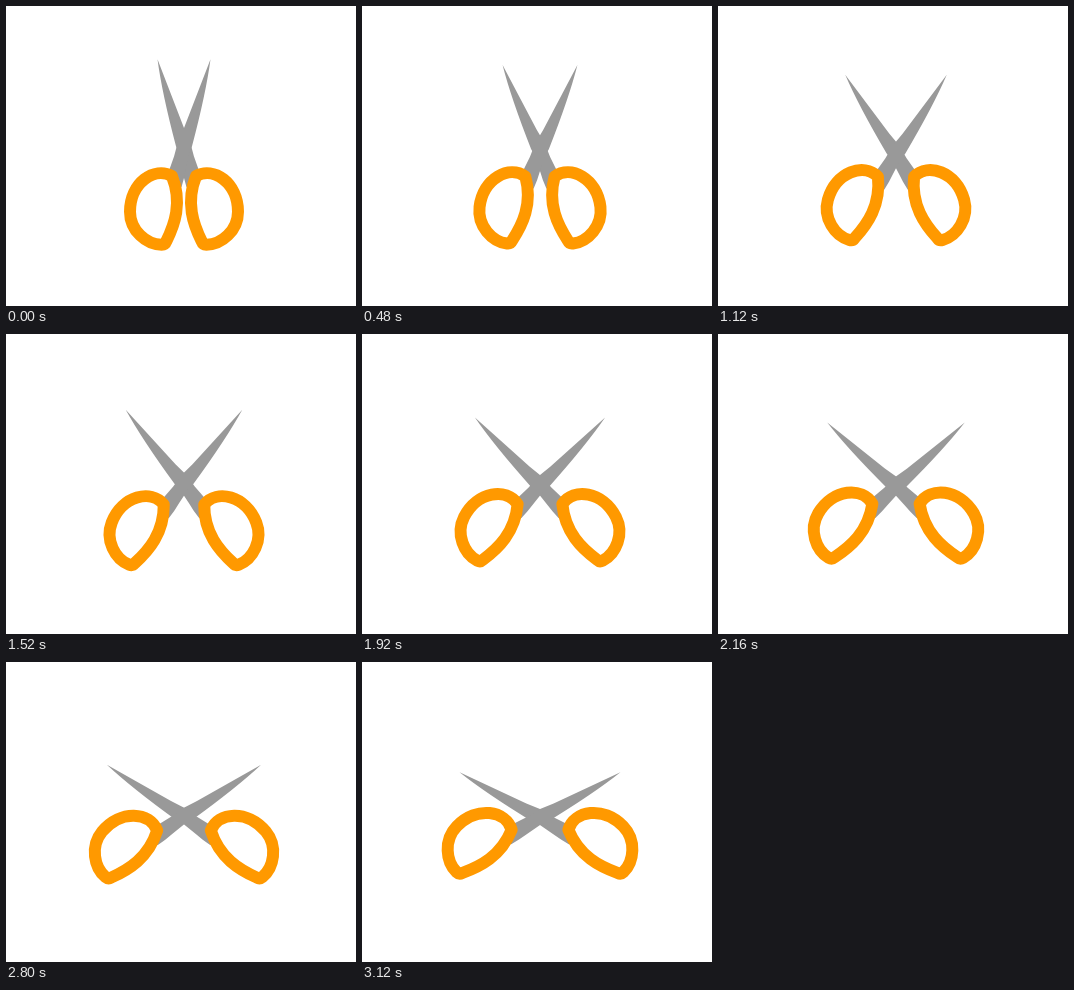
Animation of 350 by 300 pixels, one loop 3200 ms. Source, as an HTML page:

```html
<!DOCTYPE html>
<html lang="en">
<head>
<meta charset="utf-8">
<title>Scissors</title>
<style>
  html, body { margin: 0; width: 100%; height: 100%; overflow: hidden; background: #fff; }
  svg { display: block; }
  .blade { fill: #999; }
  .handle { fill: none; stroke: #f90; stroke-width: 12; stroke-linejoin: round; }
</style>
</head>
<body>
<svg width="350" height="300" viewBox="0 0 350 300">
  <defs>
    <!-- One half, drawn around its own pivot -->
    <g id="half">
      <path class="blade" d="M-43.9 -95.5 L-17.4 -26.7 L-11.4 -13.3 L-7.5 1.5 L-2.3 16.2 L-4 24 L-10 36
        L-15 32 L-17.4 23.3 L-19.2 14.1 L-22.5 -1.8 L-25.4 -8.5 Q-39.5 -62 -43.9 -95.5 Z"/>
      <path class="handle" d="M-5.3 21.3 C12 11.5 36.6 28 36.6 57 C36.6 76 20 90 5 90
        Q1.5 90 .5 87 C-8 70 -16 48 -5.3 21.3 Z"/>
    </g>
  </defs>
  <use href="#half" transform="translate(195.4 148.7)"/>
  <use href="#half" transform="translate(160.6 148.7) scale(-1 1)"/>
</svg>
<script>
  const LOOP = 3200, STEP = 80, SWING = 45;
  const half = document.getElementById('half');

  function draw() {
    const time = Math.floor(performance.now() % LOOP / STEP) * STEP;
    half.setAttribute('transform', `rotate(${-SWING * time / LOOP})`);
    requestAnimationFrame(draw);
  }
  draw();
</script>
</body>
</html>
```
